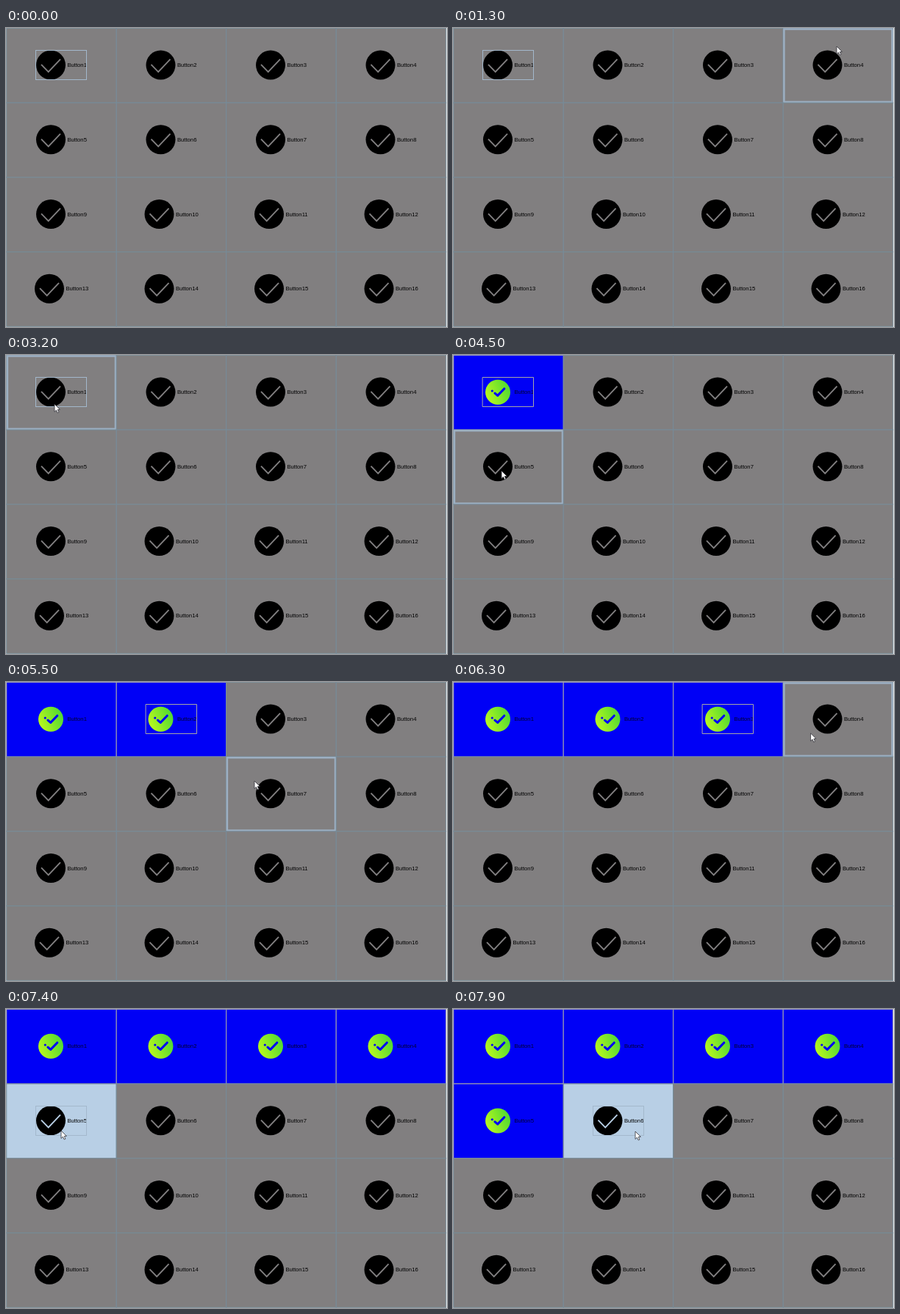
Animation, 600 px wide and 408 px high, one loop 8 s. Source, as an HTML page with a canvas:

```html
<!DOCTYPE html>
<html lang="en">
<head>
<meta charset="utf-8">
<title>Toggle buttons</title>
<style>
html, body { margin: 0; width: 100%; height: 100%; overflow: hidden; background: #fff; }
canvas { display: block; }
</style>
</head>
<body>
<canvas id="stage" width="600" height="408"></canvas>
<script>
const ctx = document.getElementById('stage').getContext('2d');
const LOOP = 8000, W = 149.5, H = 101.75, PRESS = 100;

// pointer stops: time, x, y
const stops = [
  [1100, 517, 2], [1300, 522, 25], [2200, 520, 60], [3200, 66, 67],
  [4250, 66, 67], [4500, 66, 158], [5150, 218, 70], [5500, 338, 135],
  [5900, 354, 70], [6400, 502, 70], [7000, 336, 174], [7400, 75, 166],
  [7800, 248, 167]
];
// the buttons are pressed in order, one at each time
const presses = [3500, 5200, 5900, 6400, 7400, 7900];

function pointer(t) {
  const next = stops.findIndex(s => s[0] > t);
  if (next === 0) return null;
  if (next < 0) return stops[stops.length - 1].slice(1);
  const [t0, x0, y0] = stops[next - 1], [t1, x1, y1] = stops[next];
  const u = (t - t0) / (t1 - t0), k = u * u * (3 - 2 * u);
  return [x0 + (x1 - x0) * k, y0 + (y1 - y0) * k];
}

function disc(x, y, r, fill) {
  ctx.beginPath();
  ctx.arc(x, y, r, 0, 2 * Math.PI);
  ctx.fillStyle = fill;
  ctx.fill();
}

function tick(x, y, left, low, right, color, width) {
  ctx.beginPath();
  for (const [dx, dy] of [left, low, right]) ctx.lineTo(x + dx, y + dy);
  ctx.strokeStyle = color;
  ctx.lineWidth = width;
  ctx.stroke();
}

function frame(x, y, w, h, color, width) {
  ctx.strokeStyle = color;
  ctx.lineWidth = width;
  ctx.strokeRect(x, y, w, h);
}

function icon(x, y, on, back) {
  ctx.lineCap = on ? 'round' : 'butt';
  ctx.lineJoin = on ? 'round' : 'miter';
  if (!on) {
    disc(x, y, 20, '#000');
    tick(x, y, [-13, -0.7], [-3.3, 9.2], [13, -8], back, 1.9);
    return;
  }
  const fill = ctx.createLinearGradient(x - 15, y + 6, x + 15, y - 6);
  fill.addColorStop(0, '#b6f71e');
  fill.addColorStop(1, '#52da32');
  disc(x, y + 0.2, 17, fill);
  disc(x - 7.7, y - 1.6, 1.6, back);
  tick(x, y, [-4, 1.5], [-0.3, 4.8], [8.8, -4.6], back, 3.1);
}

function button(i, { on, pressed, hover, focus }) {
  const x = 0.7 + i % 4 * W, y = 0.3 + Math.floor(i / 4) * H;
  const back = pressed ? '#b8cfe5' : on ? '#0000f6' : '#817f80';
  const shift = i > 8 ? -2 : 0;
  ctx.fillStyle = back;
  ctx.fillRect(x, y, W, H);
  ctx.lineCap = 'butt';
  ctx.lineJoin = 'miter';
  frame(x, y, W, H, on ? '#a6a6a8' : '#768b98', 1);
  if (hover && !pressed) frame(x + 1.2, y + 1.2, W - 2.4, H - 2.4, '#9cafc2', 2.5);
  icon(x + 60.3 + shift, y + 50.3, on, back);
  ctx.fillStyle = on ? '#000030' : '#000';
  ctx.fillText('Button' + (i + 1), x + 82.7 + shift, y + 52.9);
  if (focus) {
    frame(Math.floor(x + 40) + 0.5, Math.floor(y + 30) + 0.5, 69, 40, on ? '#a8a8a4' : '#a3b8cc', 1);
  }
}

function arrow(x, y) {
  const shape = [[0, 0], [0, 10.5], [2.4, 8.3], [4.2, 12], [5.9, 11.2], [4.3, 7.6], [7.4, 7.4]];
  ctx.beginPath();
  for (const [dx, dy] of shape) ctx.lineTo(x + dx, y + dy);
  ctx.closePath();
  ctx.fillStyle = '#fff';
  ctx.fill();
  ctx.strokeStyle = '#303038';
  ctx.lineWidth = 0.8;
  ctx.stroke();
}

function draw(t) {
  const at = pointer(t);
  const over = at ? Math.floor(at[0] / W) + 4 * Math.floor(at[1] / H) : -1;
  const focus = Math.max(0, presses.filter(p => p <= t).length - 1);
  ctx.fillStyle = '#fff';
  ctx.fillRect(0, 0, 600, 408);
  ctx.font = '7.7px "Liberation Sans", Arial, sans-serif';
  for (let i = 0; i < 16; i++) {
    const age = t - presses[i];
    button(i, {
      on: age >= PRESS,
      pressed: age >= 0 && age < PRESS,
      hover: i === over,
      focus: i === focus
    });
  }
  if (at) arrow(...at);
}

const start = performance.now();
function animate() {
  const t = (performance.now() - start) % LOOP;
  draw(Math.floor(t / 100) * 100);
  requestAnimationFrame(animate);
}
animate();
</script>
</body>
</html>
```
